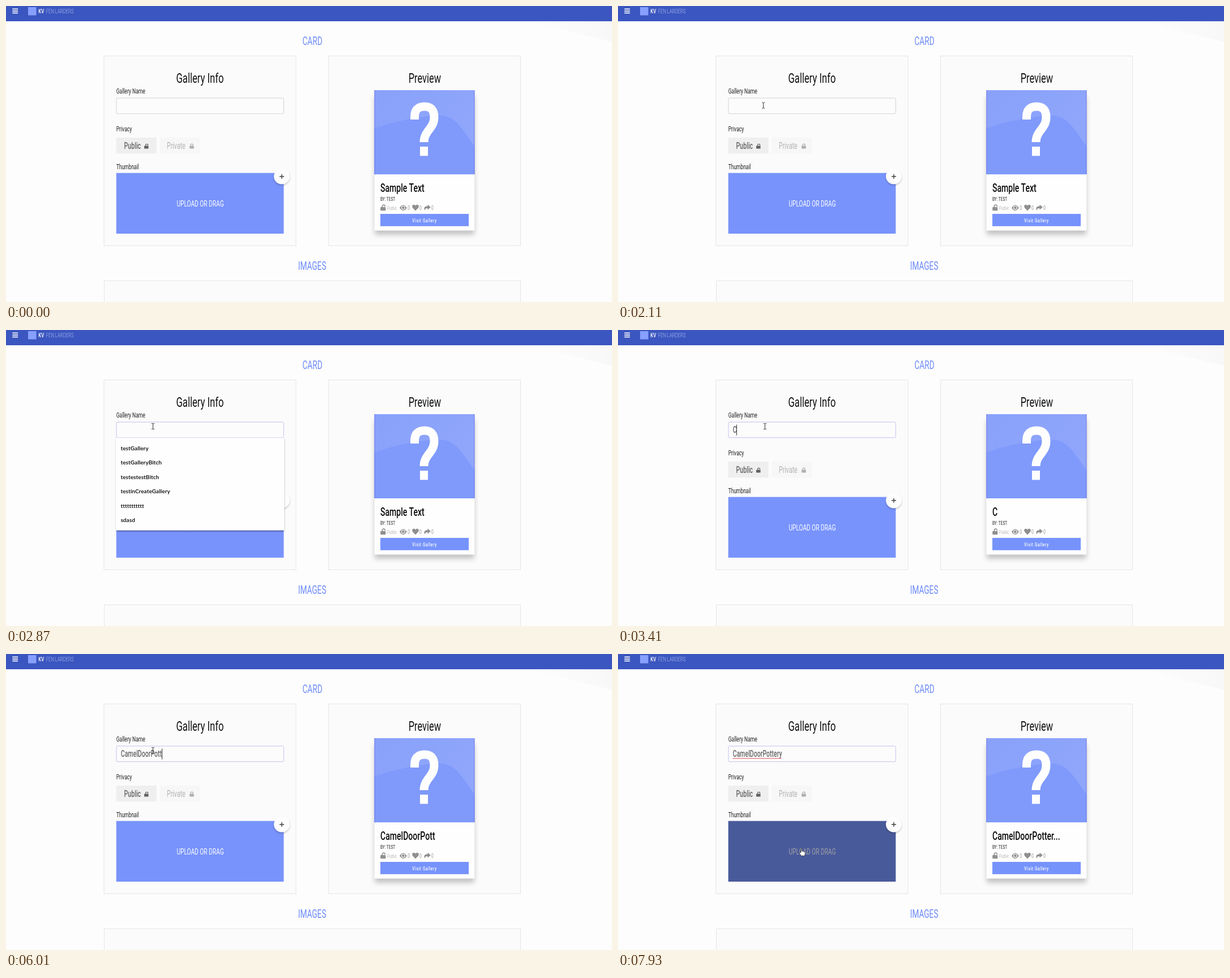
Write an HTML page that moves like this. It is 1070x524 px and loops after 7990 ms.

```html
<!DOCTYPE html>
<html lang="en">
<head>
<meta charset="utf-8">
<title>Gallery form</title>
<style>
  html, body { margin: 0; width: 100%; height: 100%; overflow: hidden; background: #fdfdfd; }
  svg { display: block; width: 1070px; height: 524px; }
  text { font-family: Roboto, "Liberation Sans", sans-serif; }
  .menu text { font: bold 10px Lato, "Open Sans", sans-serif; fill: #1c1c1c; letter-spacing: .05px; }
  .panel { fill: #fbfbfb; stroke: #e6e6e6; }
</style>
</head>
<body>
<svg id="stage" viewBox="0 0 1070 524" xmlns="http://www.w3.org/2000/svg">
  <defs>
    <linearGradient id="sky" x1="0" y1="0" x2="1" y2="1">
      <stop offset="0" stop-color="#8aa1fb"/><stop offset="1" stop-color="#91a8fb"/>
    </linearGradient>
    <linearGradient id="haze" x1="0" y1="0" x2="1" y2="0">
      <stop offset="0" stop-color="#fdfdfd"/><stop offset="1" stop-color="#f8f8f8"/>
    </linearGradient>
    <filter id="soft" x="-20%" y="-20%" width="140%" height="140%"><feGaussianBlur stdDeviation="5"/></filter>
    <filter id="blur" x="-20%" y="-20%" width="140%" height="140%"><feGaussianBlur stdDeviation="1.5"/></filter>
    <g id="lock">
      <rect y="4" width="7.6" height="5" rx=".8"/>
      <path d="M1.7 4.5V2.8a2.1 2.1 0 0 1 4.2 0V4.5" fill="none" stroke="currentColor" stroke-width="1.3"/>
    </g>
    <g id="unlock">
      <rect y="4" width="7.6" height="5" rx=".8"/>
      <path d="M2.6 4.5V2.8a2 2 0 0 1 4 0V3.4" fill="none" stroke="currentColor" stroke-width="1.3"/>
    </g>
  </defs>

  <rect width="1070" height="524" fill="#fdfdfd"/>
  <path d="M920 27H1070V63Z" fill="url(#haze)"/>

  <rect width="1070" height="27" fill="#3b56c0"/>
  <path d="M11.3 5.4h9.8M11.3 8.9h9.8M11.3 12.4h9.8" stroke="#fff" stroke-width="1.6"/>
  <rect x="39" y="2" width="14.5" height="14.5" fill="#87a0fd"/>

  <rect class="panel" x="173" y="88.5" width="339" height="336"/>
  <rect class="panel" x="569.5" y="88.5" width="339" height="336"/>
  <rect class="panel" x="173.5" y="486.5" width="735" height="60"/>

  <!-- form -->
  <rect id="field" x="195" y="163" width="295.3" height="27.6" rx="2" fill="#fcfcfc" stroke="#d3d3d3"/>
  <rect x="194.7" y="233" width="71" height="28.3" fill="#efefef"/>
  <rect x="272" y="233" width="71" height="28.3" fill="#f7f7f7"/>
  <use href="#unlock" x="244" y="243.5" fill="#626262" color="#626262"/>
  <use href="#lock" x="324.2" y="243.5" fill="#b0b0b0" color="#b0b0b0"/>
  <rect id="drop" x="194.7" y="295.6" width="295.7" height="107.4" fill="#7893fc"/>
  <circle cx="487" cy="303.5" r="14" fill="#000" opacity=".2" filter="url(#blur)"/>
  <circle cx="487" cy="301.6" r="14" fill="#fdfdfd"/>
  <path d="M483 301.7h8M487 297.7v8" stroke="#444" stroke-width="1.5"/>

  <!-- preview card -->
  <rect x="651" y="160" width="176" height="245" fill="#000" opacity=".22" filter="url(#soft)"/>
  <rect x="650.5" y="149" width="176.8" height="248.5" fill="#fefefe"/>
  <rect x="650.5" y="149" width="176.8" height="149" fill="url(#sky)"/>
  <path d="M650.5 217C680 205 735 194 766 194C794 194 806 219 827.3 248V298H650.5Z" fill="#7f9afb"/>
  <path d="M651 149V298M827 149V298" stroke="#6f7be8"/>
  <path d="M721.5 201V196Q721.5 178 739 178Q756 178 756 197C756 217 738 221 738 241" fill="none" stroke="#fefefe" stroke-width="15"/>
  <rect x="731" y="249" width="14" height="16.3" fill="#fefefe"/>
  <g fill="#8f8f8f" color="#8f8f8f">
    <use href="#unlock" transform="translate(661.2 351) scale(1.2 1.26)"/>
    <path d="M695 357.3Q701.3 347.5 707.7 357.3Q701.3 367 695 357.3Z"/>
    <circle cx="701.3" cy="357.2" r="2.9" fill="none" stroke="#fefefe" stroke-width="1.1"/>
    <path d="M723 362.6L718.2 357.6C714.8 353 720.5 349.6 723 353.6C725.5 349.6 731.2 353 727.8 357.6Z"/>
    <path d="M744.5 351.6L749.8 356.2L744.5 360.8V358C741 358 739.6 359.2 740 362.3C737 358.5 738.3 354.3 744.5 354.3Z"/>
  </g>
  <rect x="661" y="368" width="156" height="21.8" fill="#7693fc"/>

  <g id="labels"></g>
  <path id="squiggle" fill="none" stroke="#e0454f" stroke-width="1"/>
  <path id="caret" stroke="#333" stroke-width="1"/>

  <g id="menu" class="menu">
    <rect x="195" y="192" width="296" height="164" rx="2" fill="#000" opacity=".5" filter="url(#blur)"/>
    <rect x="194" y="190.5" width="297.5" height="164.2" rx="1.5" fill="#fefefe"/>
  </g>

  <path id="arrow" d="M0 0V14L3.2 11L5.4 16L7.6 15L5.4 10.2H9.8Z" fill="#fff" stroke="#222" stroke-width=".9"/>
  <path id="beam" d="M-2.5 -5H-.6L0 -4.4L.6 -5H2.5M0 -4.4V4.4M-2.5 5H-.6L0 4.4L.6 5H2.5" fill="none" stroke="#333" stroke-width="1"/>
  <path id="hand" d="M-2 1V-5.3Q-1.1 -6.6 -.2 -5.3V-1.4Q1 -2.2 1.8 -1Q3 -1.7 3.7 -.4Q5 -.8 5.4 .7V3.2Q5.4 5 4.2 6.8H-1.6Q-2.8 4.6 -4.7 2.3Q-5 .6 -3.6 .7Z" fill="#fff" stroke="#333" stroke-width=".9"/>
</svg>

<script>
const LOOP = 7990;
const NARROW = 0.67; // one condensed face for the whole page
const NAME = "CamelDoorPottery";
const NS = "http://www.w3.org/2000/svg";
const $ = id => document.getElementById(id);

function addText(parent, x, y, str, attrs = {}) {
  const el = document.createElementNS(NS, "text");
  el.textContent = str;
  for (const key in attrs) el.setAttribute(key, attrs[key]);
  el.setAttribute("transform", `translate(${x} ${y})`);
  return parent.appendChild(el);
}

function label(x, y, size, str, fill, weight = 400, anchor = "start", spacing = 0) {
  const el = addText($("labels"), x, y, str, {
    "font-size": size, fill, "font-weight": weight,
    "text-anchor": anchor, "letter-spacing": spacing
  });
  el.setAttribute("transform", `translate(${x} ${y}) scale(${NARROW} 1)`);
  return el;
}

label(57.3, 13.3, 11.8, "KV", "#fff", 500);
label(70.8, 13.3, 11.5, "FEN LARDERS", "#b0bff0", 300);
label(541, 69, 20.4, "CARD", "#6c8afa", 400, "middle");
label(540.6, 467, 20.4, "IMAGES", "#6c8afa", 400, "middle");
label(342.5, 135.6, 24.8, "Gallery Info", "#111", 400, "middle");
label(739.3, 135.6, 24.5, "Preview", "#111", 400, "middle");
label(194.7, 155.4, 12.8, "Gallery Name", "#222");
label(194.7, 221.6, 12.8, "Privacy", "#222");
label(194.7, 288.8, 12.6, "Thumbnail", "#222");
label(208.6, 252.6, 15.8, "Public", "#666", 500);
label(284, 252.6, 15.8, "Private", "#b3b3b3");
const upload = label(343, 355, 15.2, "UPLOAD OR DRAG", "#fff", 400, "middle");
const title = label(661, 329.4, 21, "", "#0c0c0c", 500);
label(661, 345.2, 9.7, "BY: TEST", "#222");
label(673, 360.6, 9.6, "Public", "#999", 300);
for (const x of [709.3, 730, 751]) label(x, 360.8, 10.4, "0", "#999");
label(739, 383, 9.7, "Visit Gallery", "#fff", 500, "middle", 1);
const typed = label(202.8, 182.4, 15.7, "", "#666", 500);

["testGallery", "testGalleryBitch", "testestestBitch", "testinCreateGallery", "ttttttttttt", "sdasd"]
  .forEach((str, i) => addText($("menu"), 202.4, 212.6 + i * 25.5, str));

// tables of [time, value]: a value holds until the next row
const LETTERS = [[0, 0], [3410, 1], [3560, 2], [3720, 3], [3870, 4], [4100, 5], [4640, 6],
  [4950, 7], [5090, 8], [5170, 9], [5550, 10], [5780, 11], [5860, 12], [6010, 13], [6170, 14], [6320, 16]];
const CARET = [[0, 0], [2430, 1], [2870, 0], [3410, 1], [6860, 0], [7320, 1], [7850, 0]];
const MENU = [[0, 0], [2510, 0.6], [2640, 1], [3410, 0]];
const DROP = [[0, ["#7893fc", "#fff"]], [7850, ["#647cd6", "#d5d6e2"]], [7930, ["#495a9b", "#a2a0a3"]]];
const POINTER = [[0, null], [2110, ["beam", 256.7, 176]], [2430, ["beam", 259.5, 170.5]],
  [7690, ["hand", 274, 196]], [7770, ["hand", 295.5, 242.5]],
  [7850, ["hand", 313, 304]], [7930, ["hand", 325, 350.5]]];

const at = (table, t) => table.findLast(row => row[0] <= t)[1];

function pointerAt(t) {
  if (t < 1470 || t >= 2110) return at(POINTER, t);
  const p = Math.floor((t - 1470) / 71) / 9;
  const ease = p * (1.6 - 0.6 * p);
  const x = 125 + 131.7 * ease, y = 12 + 164 * ease;
  return [y > 158 ? "beam" : "arrow", x, y];
}

let squiggle = "M202.5 185.5";
for (let i = 0; i < 43; i++) squiggle += `l1 -1.3l1 1.3`;
$("squiggle").setAttribute("d", squiggle);

const show = (el, on) => el.setAttribute("visibility", on ? "visible" : "hidden");

function draw(t) {
  const count = at(LETTERS, t);
  typed.textContent = NAME.slice(0, count);
  title.textContent = !count ? "Sample Text" : count > 15 ? NAME.slice(0, 15) + "..." : NAME.slice(0, count);

  const end = count ? 203.1 + typed.getComputedTextLength() * NARROW : 202.5;
  $("caret").setAttribute("d", `M${Math.floor(end) + 0.5} 167.5V186.5`);
  show($("caret"), at(CARET, t));
  show($("squiggle"), t >= 7400);
  $("field").setAttribute("stroke", t >= 2430 ? "#c5bff3" : "#d3d3d3");
  $("menu").setAttribute("opacity", at(MENU, t));

  const [back, ink] = at(DROP, t);
  $("drop").setAttribute("fill", back);
  upload.setAttribute("fill", ink);

  const pointer = pointerAt(t);
  for (const id of ["arrow", "beam", "hand"]) show($(id), pointer && pointer[0] === id);
  if (pointer) $(pointer[0]).setAttribute("transform", `translate(${pointer[1]} ${pointer[2]})`);
}

const start = performance.now();
function tick() {
  draw((performance.now() - start) % LOOP);
  requestAnimationFrame(tick);
}
tick();
</script>
</body>
</html>
```
